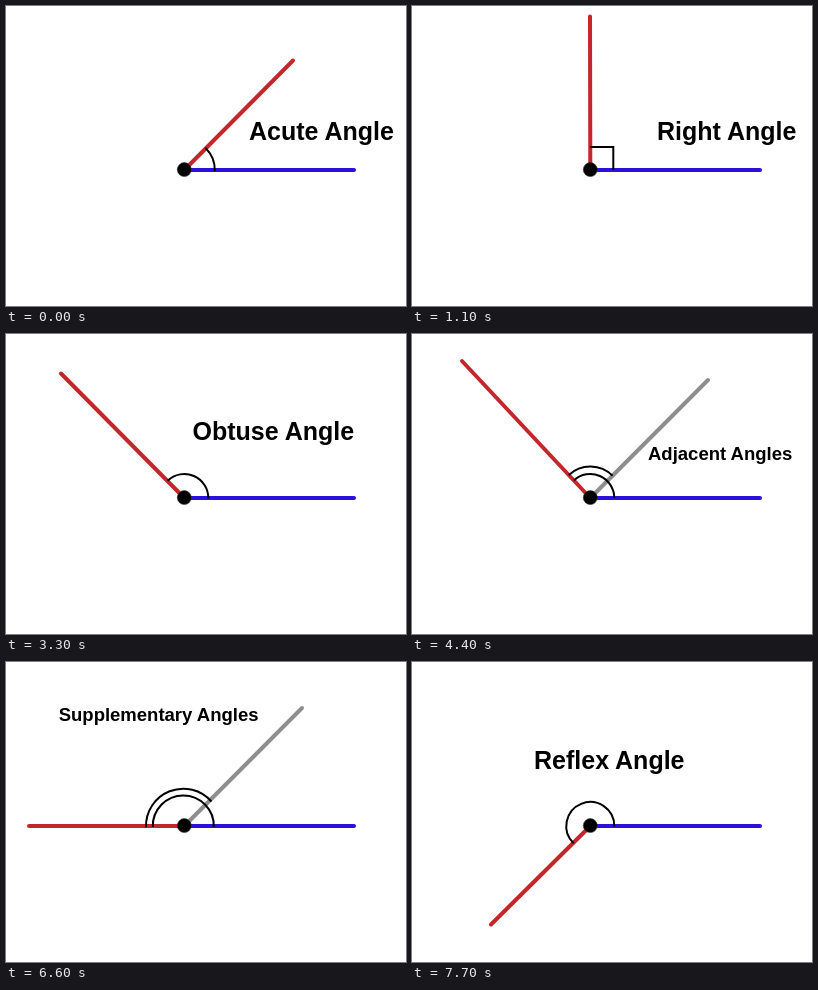
Write an HTML page that moves like this. It is 400x300 px and loops after 8800 ms.

```html
<!DOCTYPE html>
<html lang="en">
<head>
<meta charset="utf-8">
<title>Kinds of angles</title>
<style>
  html, body { margin: 0; width: 100%; height: 100%; overflow: hidden; background: #fff; }
  svg { display: block; width: 400px; height: 300px; }
  line { stroke-width: 4; stroke-linecap: round; }
  path { fill: none; stroke: #000; stroke-width: 2; }
  text { font: bold 25px "Liberation Sans", Arial, sans-serif; }
  .small { font-size: 18.5px; }
</style>
</head>
<body>
<svg id="stage" viewBox="0 0 400 300"></svg>
<script>
const SCENE_MS = 1100;
const VERTEX = { x: 178.3, y: 164 };
const GREY_END = [296, 46];
const stage = document.getElementById("stage");

const ray = ([x, y], color) =>
  `<line x1="${VERTEX.x}" y1="${VERTEX.y}" x2="${x}" y2="${y}" stroke="${color}"/>`;

// Counter-clockwise arc around the vertex, angles in degrees.
function arc(radius, from, to, dx = 0) {
  const point = degrees => {
    const a = degrees * Math.PI / 180;
    return `${VERTEX.x + dx + radius * Math.cos(a)} ${VERTEX.y - radius * Math.sin(a)}`;
  };
  const large = to - from > 180 ? 1 : 0;
  return `<path d="M${point(from)}A${radius} ${radius} 0 ${large} 0 ${point(to)}"/>`;
}

const square = size =>
  `<path d="M${VERTEX.x} ${VERTEX.y - size}h${size}v${size}"/>`;

const label = (x, y, words, size = "") =>
  `<text x="${x}" y="${y}" class="${size}">${words}</text>`;

const scenes = [
  { red: [287, 54.5], marks: arc(30.5, -2, 46),
    text: label(243, 134, "Acute Angle") },
  { red: [178, 10.5], marks: square(23),
    text: label(245, 134, "Right Angle") },
  { red: [178, 19], grey: true, marks: arc(24, 0, 90) + arc(31.5, 45, 92),
    text: label(243.5, 121, "Complementary", "small") + label(284, 142, "Angles", "small") },
  { red: [55, 39.5], marks: arc(24, -1, 134),
    text: label(186.5, 106, "Obtuse Angle") },
  { red: [50, 27], grey: true, marks: arc(24, 0, 133) + arc(31.5, 45, 133),
    text: label(236, 126, "Adjacent Angles", "small") },
  { red: [19, 164], marks: arc(24, -4, 184),
    text: label(108.5, 111, "Straight Angle") },
  { red: [23, 164], grey: true, marks: arc(30.5, -2, 182, -1) + arc(37.3, 41, 182, -1),
    text: label(52.7, 59, "Supplementary Angles", "small") },
  { red: [79, 262.5], marks: arc(24, -1, 226),
    text: label(122, 107, "Reflex Angle") }
];

const drawScene = ({ red, grey, marks, text }) =>
  (grey ? ray(GREY_END, "#8e8e8e") : "") +
  ray([348, 164], "#2b10de") +
  ray(red, "#c4262b") +
  marks +
  `<circle cx="${VERTEX.x}" cy="${VERTEX.y - .4}" r="7" stroke="#333" stroke-width=".6"/>` +
  text;

let shown = -1;
function render(now) {
  const index = Math.floor(now / SCENE_MS) % scenes.length;
  if (index !== shown) {
    stage.innerHTML = drawScene(scenes[index]);
    shown = index;
  }
}

const start = performance.now();
function tick() {
  render(performance.now() - start);
  requestAnimationFrame(tick);
}
tick();
</script>
</body>
</html>
```
